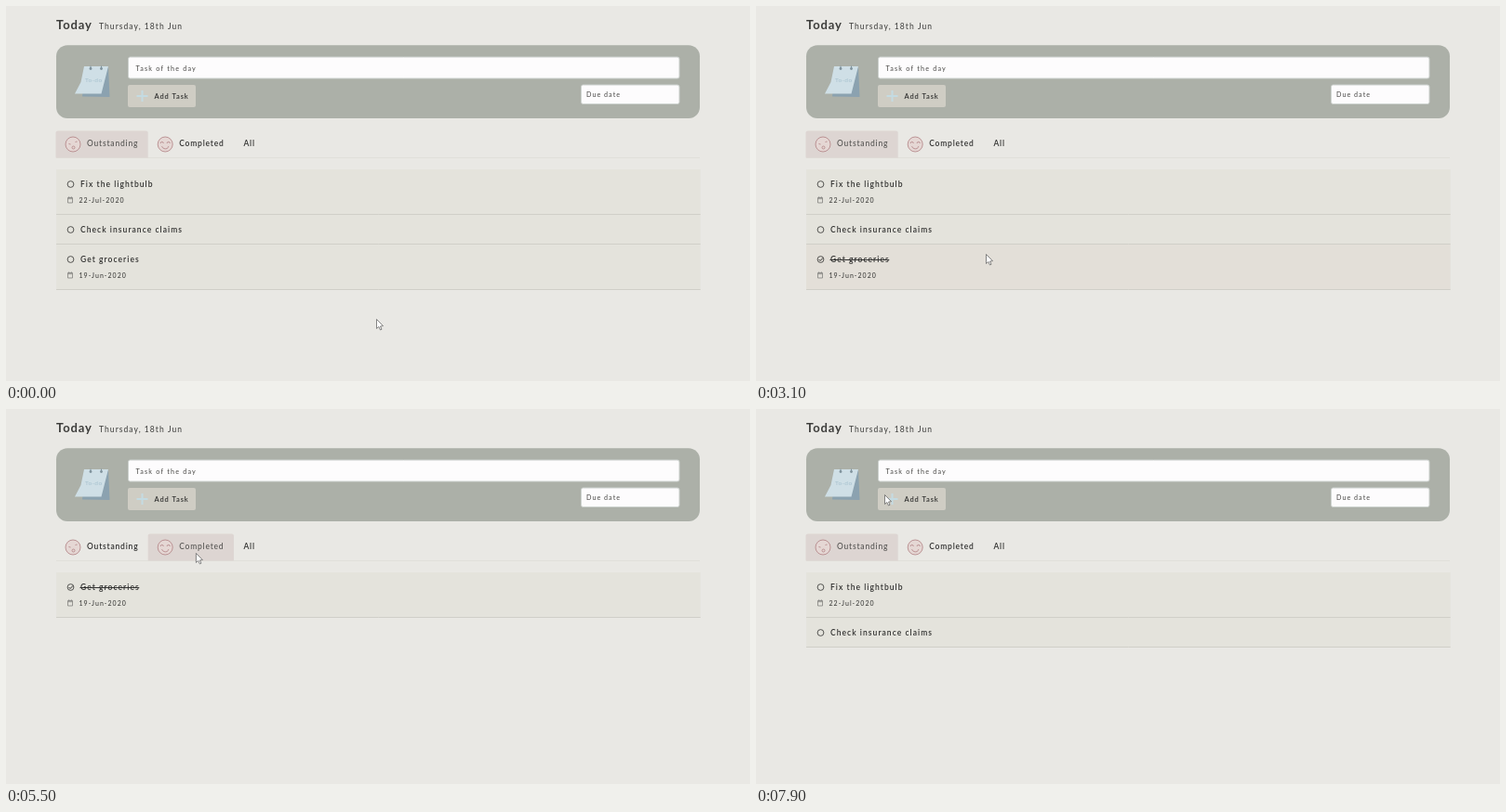
These frames come from a looping animation (800x404 px, 8000 ms). An HTML page with a canvas:

```html
<!DOCTYPE html>
<html lang="en">
<head>
<meta charset="utf-8">
<title>To-do list</title>
<style>
html, body { margin: 0; width: 100%; height: 100%; overflow: hidden; background: #e9e8e4; }
canvas { display: block; width: 800px; height: 404px; }
</style>
</head>
<body>
<canvas id="stage" width="800" height="404"></canvas>
<script>
const ctx = document.getElementById('stage').getContext('2d');
const LOOP = 8000, STEP = 100;
const LEFT = 54, RIGHT = 746, WIDTH = RIGHT - LEFT;
const TAB_TOP = 134.5, TAB_HEIGHT = 29, LIST_TOP = 176;
const PAPER = '#e9e8e4', INK = '#30302f', SOFT_INK = '#555452';

// Clicks, in ms
const TICK = 3500, SHOW_COMPLETED = 5400, SHOW_ALL = 6400, SHOW_OUTSTANDING = 7500;

const TASKS = [
  { title: 'Fix the lightbulb', date: '22-Jul-2020' },
  { title: 'Check insurance claims' },
  { title: 'Get groceries', date: '19-Jun-2020' }
];
const TABS = ['Outstanding', 'Completed', 'All'];

// Each glide brings the pointer to (x, y) between two times; it rests in the gaps.
const glide = (start, end, x, y) => ({ start, end, x, y });
const GLIDES = [
  glide(0, 100, 382, 379),
  glide(300, 1200, 160, 197),
  glide(1200, 1700, 225, 298),
  glide(1700, 1900, 239, 242),
  glide(1900, 2100, 150, 193),
  glide(2100, 2200, 258, 204),
  glide(2300, 3100, 247, 267),
  glide(4100, 5000, 201, 155),
  glide(5400, 6200, 268, 153),
  glide(6400, 6700, 118, 162),
  glide(6700, 7200, 225, 277),
  glide(7200, 7300, 100, 150),
  glide(7500, 7900, 138, 92)
];

const smooth = k => k * k * (3 - 2 * k);

function pointerAt(t) {
  let x = 398, y = 337;
  for (const leg of GLIDES) {
    if (t <= leg.start) break;
    const k = smooth(Math.min(1, (t - leg.start) / (leg.end - leg.start)));
    x += (leg.x - x) * k;
    y += (leg.y - y) * k;
  }
  return { x, y };
}

function activeTab(t) {
  if (t < SHOW_COMPLETED || t >= SHOW_OUTSTANDING) return 'Outstanding';
  return t < SHOW_ALL ? 'Completed' : 'All';
}

const inside = (p, x, y, w, h) => p.x >= x && p.x < x + w && p.y >= y && p.y < y + h;

function paint(fill, stroke, width = 1) {
  if (fill) { ctx.fillStyle = fill; ctx.fill(); }
  if (stroke) { ctx.strokeStyle = stroke; ctx.lineWidth = width; ctx.stroke(); }
}

function box(x, y, w, h, r, fill, stroke, width) {
  ctx.beginPath();
  ctx.roundRect(x, y, w, h, r);
  paint(fill, stroke, width);
}

function path(points, fill, stroke, width) {
  ctx.beginPath();
  points.forEach(([x, y]) => ctx.lineTo(x, y));
  if (fill) ctx.closePath();
  paint(fill, stroke, width);
}

function line(x0, y0, x1, y1, color, width) {
  path([[x0, y0], [x1, y1]], null, color, width);
}

function arc(x, y, r, from, to, fill, stroke, width) {
  ctx.beginPath();
  ctx.arc(x, y, r, from, to);
  paint(fill, stroke, width);
}

function circle(x, y, r, fill, stroke, width) {
  arc(x, y, r, 0, Math.PI * 2, fill, stroke, width);
}

function text(str, x, y, size, color, spacing = 1.05, weight = 500) {
  ctx.font = `${weight} ${size}px Lato, "Open Sans", sans-serif`;
  ctx.letterSpacing = spacing + 'px';
  ctx.fillStyle = color;
  ctx.fillText(str, x, y);
  return ctx.measureText(str).width;
}

function notepad() {
  path([[85, 65], [110, 66], [111.5, 98], [82, 97.5]], '#8ba2b0');
  path([[84, 65], [110, 65], [102.5, 94.5], [74, 94.5], [80.5, 82]], '#cfdfe6');
  for (const x of [91, 102.5]) {
    line(x, 64.5, x, 67, '#7f929c');
    circle(x, 67.5, 1.4, '#7f929c');
  }
  text('To-do', 85, 81.5, 6.5, '#a5c0cd', 0.4, 400);
}

function header() {
  text('Today', LEFT, 25, 13, '#3c3c3a', 0.9, 700);
  text('Thursday, 18th Jun', 100, 25, 8.5, '#484846', 1.05);
  box(LEFT, 42.3, WIDTH, 78.7, 12, '#acb0a8');
  notepad();
  box(131.5, 55, 592.5, 23, 2, '#fdfcfd', '#cdd2cf');
  text('Task of the day', 139.5, 69.5, 7.2, SOFT_INK, 1.2);
  box(618.5, 85, 105.5, 20.5, 2, '#fdfcfd', '#cdd2cf');
  text('Due date', 624, 98, 7.2, SOFT_INK, 1);
  box(131, 85, 73, 24, 2, '#cfcdc4');
  line(146.5, 91, 146.5, 103, '#c4dbe2', 2);
  line(140.5, 97, 152.5, 97, '#c4dbe2', 2);
  text('Add Task', 159.5, 99.5, 7.5, INK, 0.9, 600);
}

function face(x, y, happy) {
  const color = '#b08083', thin = 0.8;
  circle(x, y, 8, '#e5d7d4', color, thin);
  for (const side of [-1, 1]) {
    const eye = x + side * 3.5;
    if (happy) arc(eye, y - 1, 1.6, Math.PI, 0, null, color, thin);
    else line(eye - 1, y - 1.5 - side, eye + 1, y - 1.5 - side * 1.5, color, thin);
  }
  if (happy) arc(x, y + 1, 3.8, 0.3, Math.PI - 0.3, null, color, thin);
  else circle(x + 0.5, y + 3.5, 1.5, null, color, thin);
}

function tabs(active, pointer) {
  const padding = 10.5, iconRoom = 23;
  let x = LEFT - 0.5;
  line(LEFT, 163.5, RIGHT, 163.5, '#e0dfda');
  for (const name of TABS) {
    const on = name === active, hasFace = name !== 'All';
    const weight = on ? 500 : 600;
    const inset = padding + (hasFace ? iconRoom : 0);
    ctx.font = '500 8.5px Lato, "Open Sans", sans-serif';
    ctx.letterSpacing = '0.8px';
    const w = inset + ctx.measureText(name).width + padding;
    const hover = inside(pointer, x, TAB_TOP, w, TAB_HEIGHT);
    if (on) box(x, TAB_TOP, w, TAB_HEIGHT, [2, 2, 0, 0], '#ddd5d2');
    else if (hover) box(x + 0.5, TAB_TOP, w - 1, TAB_HEIGHT - 1, 2, '#eae9e5', '#dddcd7');
    if (hasFace) face(x + 18.5, 149, name === 'Completed');
    text(name, x + inset, 151, 8.5, on ? SOFT_INK : INK, 0.8, weight);
    x += w;
  }
}

function calendar(x, y) {
  const color = '#82827e', thin = 0.8;
  box(x, y, 5, 5.5, 0, null, color, thin);
  line(x, y + 1.2, x + 5, y + 1.2, color, thin);
  for (const dx of [1.2, 3.8]) line(x + dx, y - 1.2, x + dx, y + 0.5, color, thin);
}

function row(task, top, height, hover, done) {
  box(LEFT, top, WIDTH + 0.7, height, 0, hover ? '#e3dfd8' : '#e4e3dc');
  line(LEFT, top + height - 0.5, RIGHT + 0.7, top + height - 0.5, '#d0cfc8');
  const mid = top + 16;
  circle(69.5, mid, 3.4, null, INK, 0.8);
  const width = text(task.title, 80, top + 18.8, 8.5, INK, 1.05, 600);
  if (hover || done) {
    path([[67.6, mid], [69.1, mid + 1.5], [72, mid - 1.6]], null, INK);
    line(79.5, mid + 0.5, 79.5 + width, mid + 0.5, INK);
  }
  if (task.date) {
    calendar(66.5, top + 30.5);
    text(task.date, 78.5, top + 35.5, 7, '#3f3f3d', 1.05);
  }
}

function list(t, active, pointer) {
  let top = LIST_TOP;
  for (const task of TASKS) {
    const done = task.title === 'Get groceries' && t >= TICK;
    if (active !== 'All' && done !== (active === 'Completed')) continue;
    const height = task.date ? 49 : 32;
    row(task, top, height, inside(pointer, LEFT, top, WIDTH, height), done);
    top += height;
  }
}

function textCursor(x, y) {
  line(x, y - 5, x, y + 5, '#333');
  for (const end of [-5, 5]) line(x - 2.5, y + end, x + 2.5, y + end, '#333');
}

function arrow(x, y) {
  const outline = [[0, 0], [0, 10], [2.3, 8], [4, 11.5], [5.5, 10.8], [4, 7.5], [7, 7.2]];
  path(outline.map(([dx, dy]) => [x + 0.5 + dx, y + 0.5 + dy]), '#fff', '#666', 0.8);
}

function draw(now) {
  const t = Math.floor((now % LOOP) / STEP) * STEP;
  const pointer = pointerAt(t);
  const active = activeTab(t);
  ctx.fillStyle = PAPER;
  ctx.fillRect(0, 0, 800, 404);
  header();
  tabs(active, pointer);
  list(t, active, pointer);
  const overLabel = inside(pointer, 252, 142, 20, 15);
  (overLabel ? textCursor : arrow)(pointer.x, pointer.y);
}

const start = performance.now();
function frame() {
  draw(performance.now() - start);
  requestAnimationFrame(frame);
}
frame();
</script>
</body>
</html>
```
